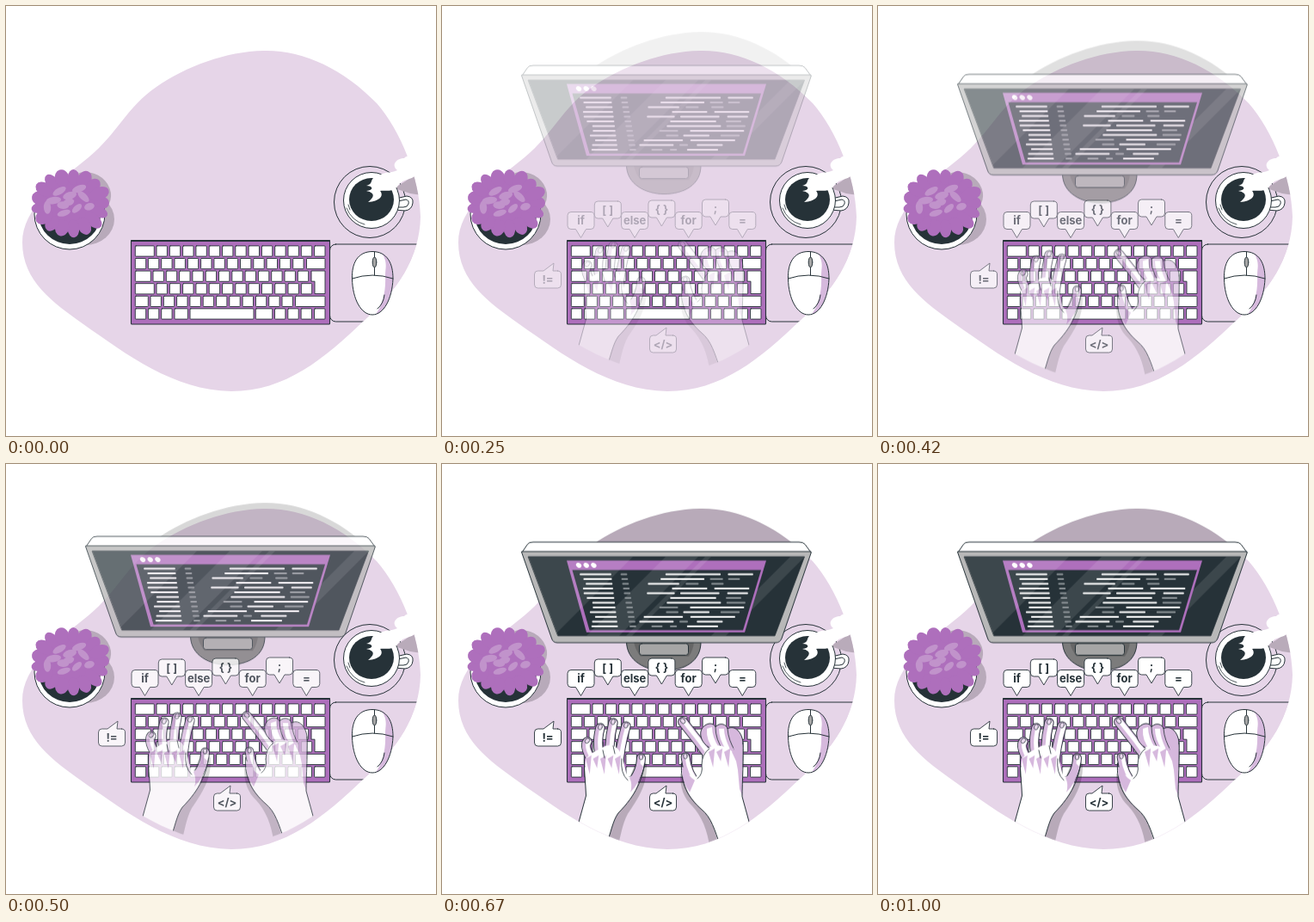
An HTML page with a canvas that plays this animation: 500 by 500 pixels, repeating every 1.04 s.

```html
<!DOCTYPE html>
<html lang="en">
<head>
<meta charset="utf-8">
<title>Coding desk</title>
<style>
html, body { margin: 0; width: 100%; height: 100%; overflow: hidden; background: #fff; }
canvas { display: block; width: 100vw; height: 100vh; }
</style>
</head>
<body>
<canvas id="stage"></canvas>
<script>
const SIZE = 500, LOOP = 1040, STEPS = 25;
const INK = '#263238', PURPLE = '#ae6fbc', PALE = '#e6d5e8', TINT = '#d6b8dd', LILAC = '#c193cb';
const SHADE = 'rgba(0,0,0,.2)';
const dpr = window.devicePixelRatio || 1;

const stage = document.getElementById('stage');
stage.width = stage.height = SIZE * dpr;
const view = stage.getContext('2d');
let g;

const BLOB = new Path2D('M300 52C345 51 392 73 431 113C459 145 481 200 482 245C481 293 455 331 416 366' +
  'C370 410 325 448 262 448C195 447 140 405 90 370C55 345 19 320 19 275C19 235 60 205 96 176' +
  'C130 148 140 118 175 94C210 70 255 53 300 52Z');

function layer(draw) {
  const c = document.createElement('canvas');
  c.width = c.height = SIZE * dpr;
  g = c.getContext('2d');
  g.scale(dpr, dpr);
  g.lineJoin = g.lineCap = 'round';
  draw();
  return c;
}

function seeded(seed) {
  return () => (seed = (seed * 16807) % 2147483647) / 2147483647;
}

function paint(path, fill, line = 0, color = INK) {
  const p = typeof path === 'string' ? new Path2D(path) : path;
  if (fill) { g.fillStyle = fill; g.fill(p); }
  if (line) { g.lineWidth = line; g.strokeStyle = color; g.stroke(p); }
}

function oval(x, y, rx, ry, fill, line = 0, turn = 0) {
  const p = new Path2D();
  p.ellipse(x, y, rx, ry, turn, 0, Math.PI * 2);
  paint(p, fill, line);
}

function box(x, y, w, h, r, fill, line = 0) {
  const p = new Path2D();
  p.roundRect(x, y, w, h, r);
  paint(p, fill, line);
}

function inside(path, draw) {
  g.save();
  g.clip(path);
  draw();
  g.restore();
}

// ---- still objects ----

function plant() {
  const rnd = seeded(11);
  oval(92, 248, 34, 30, '#b8aaba');
  oval(96, 217, 27, 23, '#b8aaba', 0, .5);
  oval(74, 242, 41, 41, '#fff', 1);
  oval(74, 242, 36, 35, INK);
  oval(75, 230, 38, 31, PURPLE);
  for (let i = 0; i < 17; i++) {
    const a = i / 17 * Math.PI * 2;
    oval(75 + Math.cos(a) * 36, 229 + Math.sin(a) * 30, 9 + rnd() * 3, 6 + rnd() * 3, PURPLE, 0, a);
  }
  for (let i = 0; i < 11; i++) {
    const a = i * 2.4, r = 9 * Math.sqrt(i);
    oval(73 + Math.cos(a) * r, 228 + Math.sin(a) * r * .6, 6 + rnd() * 3, 3.5 + rnd(), LILAC, 0, rnd() * 3);
  }
}

function cup() {
  oval(423, 228, 41.5, 41.5, PALE, 1);
  inside(BLOB, () => paint('M452 212C462 204 468 204 474 194L484 200V220L470 218Z', '#b9abba'));
  paint('M453 224L466 221Q474 222 473 229Q472 237 464 238L452 237Z', '#fff', 1);
  paint('M456 227L465 225Q469 226 468 230Q467 234 462 234L456 234Z', '#fff', 1);
  oval(425, 226, 32.5, 32.5, '#fff', 1);
  oval(425, 225, 26, 25, INK);
  paint('M396 235Q402 250 417 254M398 231L400 237', null, .8);
  paint('M419 209C429 206 421 201 432 198C440 192 446 195 455 191C447 184 455 177 463 177' +
    'C467 172 477 174 478 182L478 196C468 204 462 200 455 210C449 217 440 214 435 215' +
    'C440 221 434 227 421 228C430 221 428 217 419 215C428 214 427 209 419 209Z', '#fff');
}

function mouse() {
  inside(BLOB, () => box(376.5, 277, 130, 90, 7, PALE, 1));
  const body = new Path2D('M426 285.5C444 285.5 450 300 450 317C449 341 439 359 426 359' +
    'C413 359 403 341 402.5 317C402 300 408 285.5 426 285.5Z');
  paint(body, '#fff');
  inside(body, () => paint('M434 284C445 296 441 304 441 313C442 332 438 348 429 360L456 354V284Z', '#d6b9dd'));
  paint(body, null, 1);
  paint('M402.5 317Q426 309 450 317M428.5 286V313M440 336Q439 346 432 352', null, 1);
  oval(428.5, 298, 2.3, 6, '#a6a6a6', 1);
}

// a wide first key, a run of equal keys, then an optional wide key up to the right edge
function keyRow(row, first, count, last) {
  const y = 278.9 + row * 14.6;
  const key = (x, w) => box(x, y, w, 12.2, .8, '#fff', .9);
  key(150.3, first);
  for (let i = 0; i < count; i++) key(153 + first + i * 15.3, 12.4);
  if (last) key(last, 371 - last);
}

function keyboard() {
  box(145.5, 272.5, 231, 97.5, 1, PURPLE, 1.1);
  paint('M146 273H376', null, 2);
  keyRow(0, 22, 13);
  keyRow(1, 12.4, 12, 349.5);
  keyRow(2, 18, 12);
  keyRow(3, 22, 12);
  keyRow(4, 15, 11, 336.5);
  keyRow(5, 12.4, 2, 358.5);
  paint('M355.3 308H371V334.6H359V320.2H355.3Z', '#fff', .9);
  const low = (x, w) => box(x, 351.9, w, 12.2, .8, '#fff', .9);
  low(196, 15.4);
  low(214, 74);
  low(290.3, 19.5);
  for (let i = 0; i < 3; i++) low(312.5 + i * 15.3, 12.4);
}

// ---- monitor ----

function codeLines() {
  const rnd = seeded(29);
  const bar = (x, end, y, c) => paint(`M${x + 1} ${y}H${end - 1}`, null, 1.8, c);
  for (let i = 0; i < 12; i++) {
    const y = 128.5 + i * 5.5, limit = 362 - i * 1.5;
    bar(160 + i + rnd() * 9, 197 + i * .7, y, '#fff');
    bar(207.5 + i * .95, 215.5 + i * .95, y, '#8c9397');
    let x = 223 + rnd() * 45;
    for (let n = 0; n < 3 && x < limit - 12; n++) {
      const end = Math.min(limit, x + 8 + rnd() * 62);
      bar(x, end, y, end - x < 24 ? '#8c9397' : '#fff');
      x = end + 5 + rnd() * 10;
    }
  }
}

// a slanted band of light across the screen
function glare(x, w) {
  paint(`M${x} 108h${w}l-92 92h${-w}Z`, 'rgba(255,255,255,.1)');
}

function monitor() {
  const top = new Path2D();
  top.rect(0, 0, SIZE, 106);
  inside(top, () => paint(BLOB, SHADE));

  paint('M214.5 206C214 230 238 240.5 258 240.5C281 240.5 302 230 301 206Z', '#7c7c7c', 1);
  paint('M223 207Q225 217 231 224H287Q292 217 293 207Z', '#666');
  box(229.5, 209, 57, 13.5, 3, '#a6a6a6', 1);

  paint('M93 103L99.5 93.5Q101 91 106 91H415Q420 91 422 93.5L429 103Z', '#fff', 1);
  paint('M93 102H429V104L395 203Q393 208 388 208H134Q129 208 127.5 203L93 104Z', '#b8b8b8', 1);
  const screen = new Path2D('M100.5 108H421.5L387 200H135Z');
  paint(screen, INK, .8);
  inside(screen, () => glare(405, 17));
  paint('M145 112.5H377L352 196H168Z', PURPLE);
  paint('M151.5 123.5H371L350 193.5H171.5Z', INK);
  for (let i = 0; i < 3; i++) oval(159 + i * 8.7, 118, 3.4, 2.6, '#fff', 0, .6);
  inside(screen, () => {
    glare(100, 122);
    glare(260, 38);
    glare(306, 7);
  });
  codeLines();
}

// ---- hands ----

function finger(x0, y0, cx, cy, x1, y1, w) {
  const p = `M${x0} ${y0}Q${cx} ${cy} ${x1} ${y1}`;
  paint(p, null, w + 1.8, INK);
  paint(p, null, w, TINT);
  g.save();
  g.translate(w * .2, 0);
  paint(p, null, w * .5, '#fff');
  g.restore();
  oval(x1, y1 - 1, w * .25, w * .34, '#ead9ee', .7, Math.atan2(x1 - cx, cy - y1));
}

// pointed shadows running down the back of a hand
function spikes(x, y, count, gap) {
  for (let i = 0; i < count; i++) {
    const sx = x + i * gap;
    paint(`M${sx} ${y}l${gap * .8} -4l-2 ${22 - i % 2 * 7}Z`, TINT);
  }
}

function leftHand() {
  paint('M224 350L238 348C239 372 230 387 216 407C209 420 208 434 203 450H185Z', SHADE);
  for (let i = 0; i < 4; i++)
    finger(180 + i * 8.5, 353, 163 + i * 14.5, 330, 169 + i * 15, 301 + 5 * (i - 2.1) ** 2, 9.5);
  finger(214, 377, 231, 362, 231.5, 342, 9);
  paint('M157 424L167.5 386C167 371 165.5 356 167 343C174 335 183 332 190 328C201 325 208 333 210 343' +
    'C214 355 213 362 218 364L229 360C229 377 222 388 205 406C198 416 197 428 190 446L157 430Z', '#fff');
  paint('M157 424L167.5 386C167 371 165 357 165.5 344M235.5 349C233 366 226 385 205 406C198 416 197 428 190 446', null, 1);
  spikes(167, 343, 5, 8.5);
  paint('M209 343Q207 360 216 368M187 333l2 9M199 328l2 9', null, .8);
  paint('M218 365Q228 358 230 348L234 352Q231 370 219 382Q222 373 218 365Z', TINT);
}

function rightHand() {
  paint('M277 360L290 366L320 412L324 450H312C309 426 302 410 291 398C281 388 277 378 277 360Z', SHADE);
  finger(314, 345, 298, 322, 280, 300, 10);
  paint('M311 330C300 324 297 310 306 304C312 300 317 303 318 306C323 300 331 303 332 308' +
    'C341 303 349 313 350 324L349 350H311Z', TINT, 1);
  paint('M308 308Q307 322 316 332L322 330Q314 318 314 306ZM322 308Q322 320 330 332L335 332Q328 318 328 308Z', '#fff');
  paint('M318 306Q318 321 327 333M332 308Q333 322 341 334', null, .8);
  finger(298, 374, 285, 360, 283, 341, 9);
  paint('M360 427L349 387C349 371 347 354 342 341C336 329 324 326 314 328C305 332 302 340 302 350' +
    'C302 360 298 362 295 364L282 360C281 378 288 388 302 402C313 411 317 425 324 450H362Z', '#fff');
  spikes(310, 335, 4, 9);
  paint('M339 330L344 356L346 378L349 386L350 326Z', TINT);
  paint('M360 427L349 387C349 371 351 340 350 324M278.5 348C277 372 286 388 302 402C313 411 317 425 324 446', null, 1);
  paint('M302 350Q304 361 297 366M311 331Q302 338 302 350', null, .8);
  paint('M283 350Q285 363 294 368L288 382Q279 370 279 354Z', TINT);
}

// ---- speech bubbles ----

// tip: x of an upward tail; without it the tail points down from the middle
function bubble(text, x, y, tip) {
  const r = x + 31, b = y + 20, cx = x + 15.5;
  const up = tip ? `H${tip}L${tip + 1} ${y - 9}L${tip - 11} ${y}` : '';
  const down = tip ? '' : `H${cx - 6}L${cx} ${b + 10}L${cx + 6} ${b}`;
  paint(`M${r - 4} ${y}${up}H${x + 4}Q${x} ${y} ${x} ${y + 4}V${b - 4}Q${x} ${b} ${x + 4} ${b}${down}` +
    `H${r - 4}Q${r} ${b} ${r} ${b - 4}V${y + 4}Q${r} ${y} ${r - 4} ${y}Z`, '#fff', .9);
  g.fillStyle = INK;
  g.fillText(text, cx, y + 14.5);
}

function bubbles() {
  g.font = '700 13px Inter, "Open Sans", sans-serif';
  g.textAlign = 'center';
  const row = ['if', '[ ]', 'else', '{ }', 'for', ';', '='];
  row.forEach((text, i) => bubble(text, 146 + i * 31.3, i % 2 ? 227.5 - i * .5 : 239.5));
  bubble('!=', 107.5, 308, 129);
  bubble('</>', 241.5, 383, 260);
}

// ---- motion ----

const curve = (s, a, b) => 3 * (1 - s) ** 2 * s * a + 3 * (1 - s) * s * s * b + s ** 3;

// cubic-bezier(.36, -.01, .5, 1.38): settles after a slight overshoot
function ease(t) {
  let lo = 0, hi = 1;
  for (let i = 0; i < 30; i++) {
    const mid = (lo + hi) / 2;
    if (curve(mid, .36, .5) < t) lo = mid; else hi = mid;
  }
  return curve(hi, -.01, 1.38);
}

const desk = layer(() => { paint(BLOB, PALE); plant(); cup(); mouse(); keyboard(); });
const sliding = layer(() => { monitor(); inside(BLOB, () => { leftHand(); rightHand(); }); });
const signs = layer(bubbles);

function frame(now) {
  const step = Math.min(STEPS - 1, Math.floor((now % LOOP + 3.4) * .024));
  view.globalAlpha = 1;
  view.fillStyle = '#fff';
  view.fillRect(0, 0, stage.width, stage.height);
  view.drawImage(desk, 0, 0);
  if (step > 1) {
    const p = ease((step + 1) / STEPS);
    view.globalAlpha = Math.max(0, Math.min(1, p));
    view.drawImage(sliding, 0, (30 * (p - 1) - .3) * dpr);
    view.drawImage(signs, 0, 0);
  }
}

let start = null;
function tick(now) {
  if (start === null) start = now;
  frame(now - start);
  requestAnimationFrame(tick);
}
frame(0);
requestAnimationFrame(tick);
</script>
</body>
</html>
```
